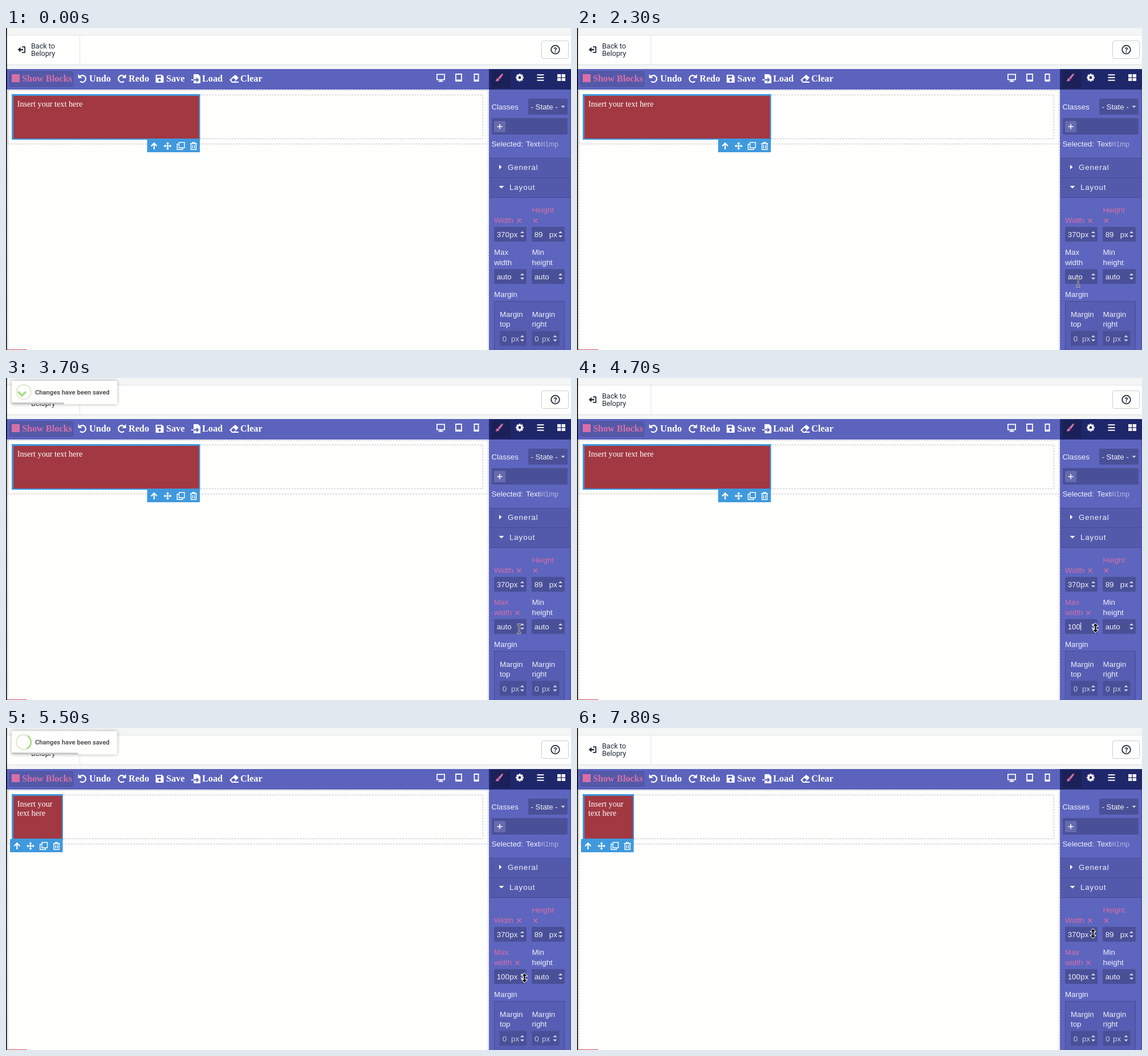
An HTML page with a canvas for the animation above (8 s loop, 991 by 565 pixels).

```html
<!DOCTYPE html>
<html lang="en">
<head>
<meta charset="utf-8">
<title>Page builder</title>
<style>
html, body { margin: 0; width: 100%; height: 100%; overflow: hidden; background: #fffffe; }
canvas { display: block; }
</style>
</head>
<body>
<canvas id="stage" width="991" height="565"></canvas>
<script>
const ctx = document.getElementById('stage').getContext('2d');
const LOOP = 8000;
const SANS = '"Liberation Sans", Arial, sans-serif';
const SERIF = '"Liberation Serif", "Times New Roman", serif';
const ROBOTO = 'Roboto, sans-serif';
const C = {
  panel: '#5d65be', bar: '#5c63bd', field: '#4a5098', row: '#535aac', line: '#454b94',
  navy: '#1f276b', pink: '#d76fa8', blue: '#4099dd', red: '#a13842', ink: '#202b36',
  pale: '#f0f1fa', dim: '#c3c6e4'
};

function rect(x, y, w, h, color) {
  ctx.fillStyle = color;
  ctx.fillRect(x, y, w, h);
}

function round(x, y, w, h, r, fill, stroke) {
  ctx.beginPath();
  ctx.roundRect(x, y, w, h, r);
  if (fill) { ctx.fillStyle = fill; ctx.fill(); }
  if (stroke) { ctx.strokeStyle = stroke; ctx.lineWidth = 1; ctx.stroke(); }
}

function text(str, x, y, color = C.pale, font = '13.3px ' + SANS, gap = 0) {
  ctx.font = font;
  ctx.letterSpacing = gap + 'px';
  ctx.fillStyle = color;
  ctx.fillText(str, x, y);
  ctx.letterSpacing = '0px';
}

// Draws a path around (x, y): stroked when a width is given, else filled.
function icon(x, y, d, color = '#fff', width = 0, flip = 1) {
  const path = new Path2D(d);
  ctx.save();
  ctx.translate(x, y);
  ctx.scale(flip, 1);
  if (width) {
    ctx.strokeStyle = color;
    ctx.lineWidth = width;
    ctx.stroke(path);
  } else {
    ctx.fillStyle = color;
    ctx.fill(path, 'evenodd');
  }
  ctx.restore();
}

function dashed(x, y, w, h) {
  ctx.strokeStyle = '#bcbcbf';
  ctx.lineWidth = 1;
  ctx.setLineDash([3, 2]);
  ctx.strokeRect(x + .5, y + .5, w, h);
  ctx.setLineDash([]);
}

function header() {
  rect(0, 0, 991, 72, '#f3f6f5');
  rect(0, 13, 991, 51, '#fffffe');
  rect(0, 12, 991, 1, '#e2e5e6');
  rect(0, 64, 991, 1, '#d9dcde');
  rect(129, 13, 1, 51, '#e1e4e6');
  icon(27, 38, 'M-6.5 0L-1.5 -4.5V-1.3H3V1.3H-1.5V4.5Z', C.ink);
  icon(27, 38, 'M1 -4.8H6V4.8H1', C.ink, 1.8);
  text('Back to', 44, 36, C.ink, '12.6px ' + ROBOTO);
  text('Belopry', 44, 49, C.ink, '12.6px ' + ROBOTO);
  round(939.5, 22.5, 47, 31, 3, '#fffffe', '#c9cdd1');
  icon(963.5, 38, 'M7.3 0A7.3 7.3 0 1 1 -7.3 0A7.3 7.3 0 1 1 7.3 0', C.ink, 1.8);
  ctx.textAlign = 'center';
  text('?', 963.5, 42.5, C.ink, 'bold 12px ' + ROBOTO);
  ctx.textAlign = 'left';
}

function toolbar() {
  rect(0, 72, 847, 36, C.bar);
  round(6.5, 76.5, 111, 26, 2, '#5459a8', '#4d529c');
  rect(10, 81, 14, 14, C.pink);
  const bold = 'bold 16.2px ' + SERIF;
  text('Show Blocks', 28, 94, C.pink, bold);
  text('Undo', 146, 94, '#fff', bold);
  text('Redo', 215, 94, '#fff', bold);
  text('Save', 281, 94, '#fff', bold);
  text('Load', 344, 94, '#fff', bold);
  text('Clear', 411, 94, '#fff', bold);
  for (const [x, flip] of [[134, 1], [203, -1]]) {
    icon(x, 89, 'M-5 -3A5.9 5.9 0 1 1 -4 4.5', '#fff', 2.3, flip);
    icon(x, 89, 'M-7.5 -8V-1H-.5Z', '#fff', 0, flip);
  }
  icon(269.5, 89, 'M-7 -7H4L7 -4V7H-7ZM-4.7 -5.2H2.5V-1.5H-4.7ZM-2.2 2.8a2.2 2.2 0 1 0 4.4 0a2.2 2.2 0 1 0 -4.4 0Z');
  icon(333, 89, 'M-4 -8H4L8 -4V8H-4ZM-4 1H1V-2.5L5.5 2L1 6.5V3H-4ZM-8 1H-4V3H-8Z');
  icon(400, 89, 'M-8 2L2 -7L8 -2L1.5 5H8V7H-4ZM-5 2L-1 -1.6L3 2L0 5H-3Z');
  icon(762.5, 87, 'M-6.6 -5.6H6.6V3.6H-6.6ZM0 4V6.5M-4 6.5H4', '#fff', 1.8);
  icon(794, 87, 'M-5 -6H5V6H-5ZM-5 4.5H5', '#fff', 1.8);
  icon(825, 87, 'M-3.6 -6H3.6V6H-3.6ZM-3.6 4.3H3.6', '#fff', 1.8);
}

function tabs() {
  rect(847, 72, 144, 36, C.navy);
  rect(851, 74, 34, 32, '#1b2158');
  icon(865, 87, 'M6.8 -7.2L4.5 -6.5L-2 .3L1 3L6.5 -4.5ZM-2.6 1L.5 3.8Q-1 7.5 -7 6Q-4.5 5 -4.8 3Q-4.5 1 -2.6 1Z', C.pink);
  ctx.save();
  ctx.translate(901, 87);
  for (let i = 0; i < 8; i++) {
    rect(-1.6, -6.8, 3.2, 3, '#fff');
    ctx.rotate(Math.PI / 4);
  }
  ctx.restore();
  icon(901, 87, 'M3.8 0A3.8 3.8 0 1 1 -3.8 0A3.8 3.8 0 1 1 3.8 0', '#fff', 2.8);
  icon(937.5, 87, 'M-6 -4.8H6M-6 0H6M-6 4.8H6', '#fff', 2);
  icon(974, 87, 'M-7 -6H-.7V-.6H-7ZM.7 -6H7V-.6H.7ZM-7 .8H-.7V6H-7ZM.7 .8H7V6H.7Z');
}

function stepper(x, y) {
  icon(x, y, 'M-3.5 -2L0 -5.5L3.5 -2ZM-3.5 2H3.5L0 5.5Z', '#d9dbef');
}

function field(x, y, w, value, unit, unitX, color) {
  round(x, y, w, 26, 2, C.field);
  text(value, x + 4.7, y + 18, color);
  if (unit) text(unit, unitX, y + 18, color);
  stepper(x + w - 7.5, y + 13);
}

function panel(s) {
  rect(847, 108, 144, 457, C.panel);
  rect(989, 108, 2, 457, '#5259a9');
  tabs();
  text('Classes', 851.5, 143);
  round(916, 124, 69, 28, 2, C.field);
  text('- State -', 920.5, 143);
  icon(977, 138, 'M-3.5 -1.5H3.5L0 2Z', '#d9dbef');
  round(852, 158, 133, 29, 2, C.field);
  round(856, 163, 20, 20, 2, '#666bae');
  icon(866, 173, 'M-4.5 0H4.5M0 -4.5V4.5', '#fff', 1.5);
  text('Selected:', 851.5, 208);
  text('Text', 912, 208);
  text('#i1mp', 936, 208, '#b3b7df', '12.1px ' + SANS);

  rect(848, 228, 141, 69, C.row);
  for (const y of [228, 262, 297]) rect(848, y, 141, 1, C.line);
  icon(867, 244, 'M-2 -4L2.5 0L-2 4Z', '#fff');
  icon(869, 279, 'M-4.5 -2H4.5L0 2.5Z', '#fff');
  text('General', 880, 249, C.pale, undefined, .9);
  text('Layout', 883, 284, C.pale, undefined, .9);

  const cross = 'M-3.5 -3.5L3.5 3.5M3.5 -3.5L-3.5 3.5';
  text('Width', 856, 342, C.pink);
  text('Height', 922.5, 324, C.pink);
  icon(900, 338, cross, C.pink, 1.3);
  icon(928.5, 338, cross, C.pink, 1.3);
  field(856, 349, 57, '370', 'px', 883.3);
  field(922, 349, 58, '89', 'px', 952.8);

  const label = s.capped ? C.pink : C.pale;
  text('Max', 856, 398, label);
  text('width', 856, 416, label);
  if (s.capped) icon(897, 412, cross, C.pink, 1.3);
  text('Min', 922.5, 398);
  text('height', 922.5, 416);
  field(856, 423, 57, s.value, s.unit, 883.3);
  if (s.caret) rect(861 + s.value.length * 7.4, 429, 1, 14, '#fff');
  field(922, 423, 58, 'auto');

  text('Margin', 856, 472);
  ctx.fillStyle = '#565db2';
  ctx.fillRect(856, 479, 124, 90);
  ctx.strokeStyle = C.line;
  ctx.lineWidth = 1;
  ctx.strokeRect(856.5, 479.5, 123, 90);
  text('Margin', 866, 507);
  text('top', 866, 524);
  text('Margin', 922.5, 507);
  text('right', 922.5, 524);
  field(866, 531.5, 47, '0', 'px', 886, C.dim);
  field(922.5, 531.5, 48, '0', 'px', 940, C.dim);
}

function page(small) {
  rect(0, 108, 847, 457, '#fffffe');
  dashed(3, 109, 842, 470);
  dashed(3, 109, 842, 94);
  dashed(11, 117, 825, 77);
  const right = small ? 100 : 340.5;
  rect(10, 116, right - 10, 80, C.blue);
  rect(13, 119, right - 15, 75, C.red);
  const lines = small ? ['Insert your', 'text here'] : ['Insert your text here'];
  lines.forEach((l, i) => text(l, 19.7, 138 + i * 16, '#fff', '14.2px ' + SERIF));
  const x = small ? 7 : 247.5;
  rect(x, 195, 92.5, 23, C.blue);
  icon(x + 12.3, 207, 'M0 6V-5M-5 .3L0 -5L5 .3', '#fff', 2.2);
  icon(x + 36, 207, 'M-5 0H5M0 -5V5', '#fff', 1.7);
  icon(x + 36, 207, 'M0 -7L2.8 -3.8H-2.8ZM0 7L2.8 3.8H-2.8ZM-7 0L-3.8 2.8V-2.8ZM7 0L3.8 2.8V-2.8Z');
  icon(x + 59, 207, 'M-3 -6.3H6.5V3.3H-3ZM-3.5 -3.2H-6.3V6.3H3.3V3.5', '#fff', 1.4);
  icon(x + 81.5, 207, 'M-6 -4.2H6M-4.5 -4V6.3H4.5V-4M-2 -4.2V-6.3H2V-4.2M-1.7 -1.5V4M1.7 -1.5V4', '#fff', 1.4);
  rect(2, 564, 35, 1, '#d8505c');
}

const clamp = v => Math.max(0, Math.min(1, v));
const ease = p => 1 - Math.pow(1 - p, 1.8);

// Sways in with falling height and tilt: [time, y, degrees].
const SWAY = [[0, -8.9, 2], [165, 0, -2], [330, 4.4, 2], [500, 0, 0]];

function sway(age) {
  for (let i = 1; i < SWAY.length; i++) {
    const a = SWAY[i - 1], b = SWAY[i];
    if (age < b[0]) {
      const p = ease((age - a[0]) / (b[0] - a[0]));
      return [a[1] + (b[1] - a[1]) * p, a[2] + (b[2] - a[2]) * p];
    }
  }
  return [0, 0];
}

function ring(from, to, color) {
  ctx.beginPath();
  ctx.arc(31, 24.5, 12.8, from, to);
  ctx.strokeStyle = color;
  ctx.lineWidth = 2.6;
  ctx.stroke();
}

function toast(age) {
  const fade = clamp((age - 1100) / 100);
  if (age < 0 || fade >= 1) return;
  const [dy, tilt] = sway(age);
  ctx.save();
  ctx.globalAlpha = 1 - fade;
  ctx.translate(102.5, 25.5 + dy);
  ctx.rotate((tilt + fade) * Math.PI / 180);
  ctx.translate(-102.5, -25.5);
  ctx.shadowColor = 'rgba(0,0,0,.3)';
  ctx.shadowBlur = 6;
  round(10, 5, 185, 41, 2, '#fffffe');
  ctx.shadowColor = 'transparent';
  rect(10, 43, 185 * clamp(1 - (age - 20) / 1190), 3, '#c6c6c6');

  ring(0, 7, '#e4ecd9');
  const turn = clamp((age - 212) / 378) * 360;
  if (turn > 0 && turn < 360) {
    const from = turn < 180 ? 120 - turn : -60;
    const to = turn < 180 ? 120 : 300 - turn;
    ring(from * Math.PI / 180, to * Math.PI / 180, '#a5dc86');
  }
  const tip = clamp((age - 480) / 80), long = clamp((age - 560) / 120);
  if (tip > 0) {
    ctx.beginPath();
    ctx.moveTo(22, 25);
    ctx.lineTo(22 + 6 * tip, 25 + 6 * tip);
    if (long > 0) ctx.lineTo(28 + 11.5 * long, 31 - 11.5 * long);
    ctx.strokeStyle = '#a5dc86';
    ctx.lineWidth = 3.6;
    ctx.lineCap = 'round';
    ctx.stroke();
  }
  text('Changes have been saved', 51, 28.5, '#545454', 'bold 11.2px ' + ROBOTO);
  ctx.restore();
}

// Pointer stops: [time, x, y, kind].
const POINTER = [
  [700, 926, 483, 'arrow'], [800, 908, 465, 'arrow'], [900, 893, 452, 'arrow'],
  [1100, 882, 425, 'arrow'], [1500, 873, 363, 'beam'], [1600, 876, 405, 'arrow'],
  [1700, 879, 445, 'beam'], [2300, 879, 446, 'beam'], [2600, 879, 449, 'beam'],
  [3600, 889, 445, 'beam'], [3700, 900, 440, 'beam'], [3800, 909.5, 438.5, 'resize'],
  [7100, 907, 430, 'resize'], [7200, 900, 412, 'arrow'], [7300, 893, 393, 'arrow'],
  [7400, 887, 368, 'beam'], [7500, 885, 350, 'beam'], [7600, 891, 353, 'beam'],
  [7700, 899, 358, 'beam'], [7800, 905, 360.5, 'resize']
];
const SHAPES = {
  arrow: 'M0 0V14L3.3 11L5.6 16.5L8 15.5L5.7 10.2H10Z',
  beam: 'M-3.5 -7.5H-1L0 -6.8L1 -7.5H3.5M0 -7V7M-3.5 7.5H-1L0 6.8L1 7.5H3.5',
  resize: 'M0 -8L4 -3.5H1.2V3.5H4L0 8L-4 3.5H-1.2V-3.5H-4Z'
};

function pointer(t) {
  const stop = POINTER.filter(p => p[0] <= t).pop();
  if (!stop) return;
  const [, x, y, kind] = stop;
  const d = SHAPES[kind];
  if (kind === 'beam') {
    icon(x, y, d, '#fff', 2.6);
    icon(x, y, d, '#111', 1.2);
  } else {
    icon(x, y, d, '#fff', 1.8);
    icon(x, y, d, '#111');
  }
}

function stateAt(t) {
  const typed = t < 4300 ? 0 : t < 4500 ? 1 : t < 4700 ? 2 : 3;
  const done = t >= 5100;
  return {
    capped: t >= 3100,
    small: done,
    value: typed ? '100'.slice(0, typed) : 'auto',
    unit: done ? 'px' : '',
    caret: typed > 0 && !done
  };
}

function draw(ms) {
  const t = Math.floor((ms % LOOP) / 100) * 100;
  const s = stateAt(t);
  header();
  toolbar();
  page(s.small);
  panel(s);
  if (t >= 3100 && t < 4400) toast(t - 3080);
  if (t >= 5100 && t < 6400) toast(Math.min(t, 6200) - 5040);
  rect(0, 0, 1.6, 565, '#050505');
  pointer(t);
}

const start = performance.now();
function tick() {
  draw(Math.max(0, performance.now() - start));
  requestAnimationFrame(tick);
}
tick();
</script>
</body>
</html>
```
